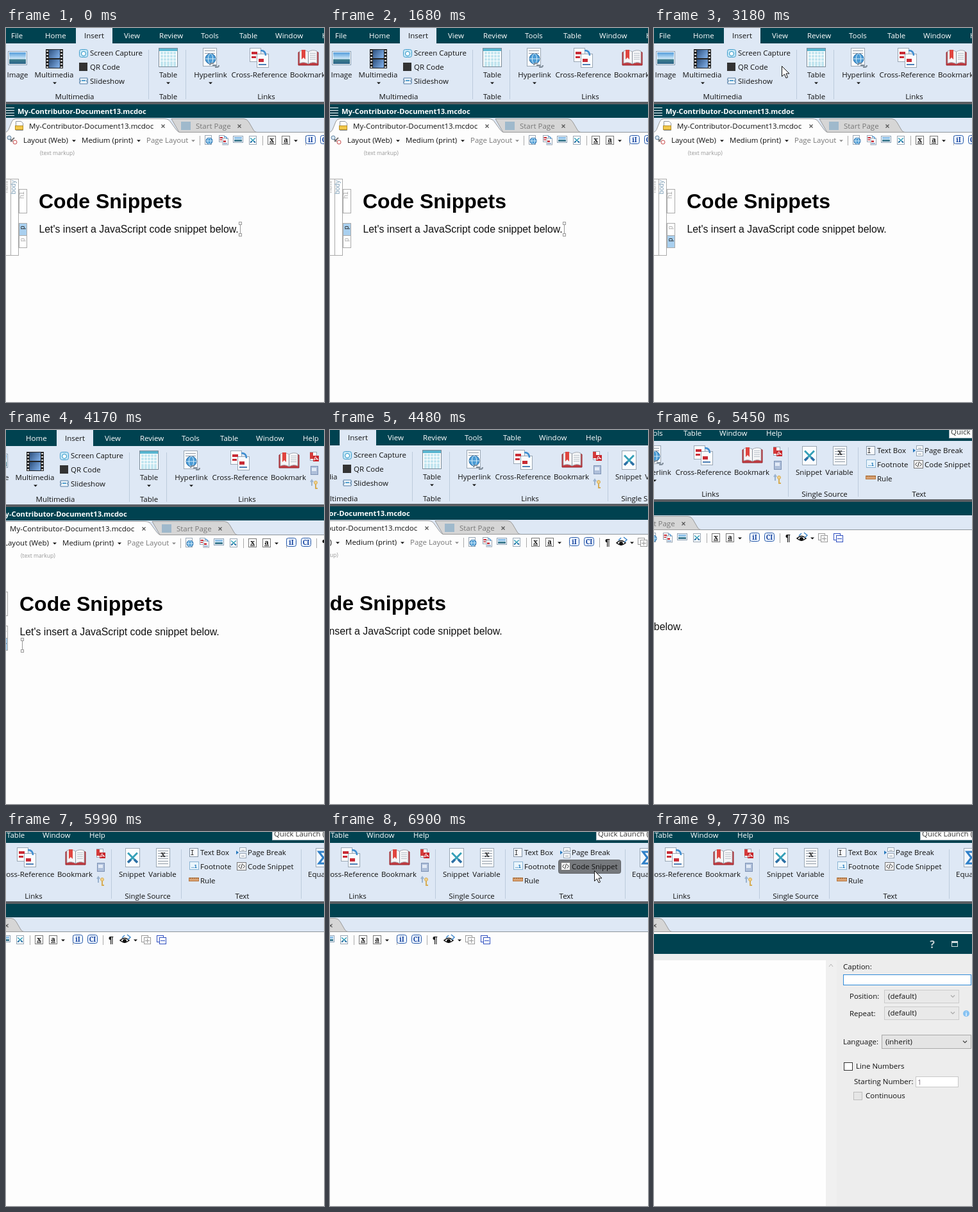
An HTML page with a canvas that plays this animation: 496x583 px, repeating every 8000 ms.

```html
<!DOCTYPE html>
<html lang="en">
<head>
<meta charset="utf-8">
<title>Insert a code snippet</title>
<style>
html, body { margin: 0; width: 100%; height: 100%; overflow: hidden; background: #fdfdfd; }
canvas { display: block; }
</style>
</head>
<body>
<canvas id="stage" width="496" height="583"></canvas>
<script>
const ctx = document.getElementById('stage').getContext('2d');
const UI = '11.5px "Open Sans", "Noto Sans", sans-serif';
const BOLD = 'bold 11.2px "Open Sans", "Noto Sans", sans-serif';
const ARIAL = '"Liberation Sans", Arial, sans-serif';
const TEAL = '#004250', RIBBON = '#dee8f5', PAPER = '#fdfdfd', BLUE = '#3b82c4', INK = '#111';
const LOOP = 8000;

// Moments at which the camera or the pointer takes a new position.
const ticks = [0, 2890, 3040, 3180, 3320, 3460, 4050, 4170, 4320, 4470, 4620, 4770, 4910, 5060,
  5180, 5320, 5450, 5600, 5730, 6240, 6400, 6570, 6740, 6900, 7180, 7320];
const cameraKeys = [[4030, 0, 0], [4170, -30, 1], [4910, -188, -2], [5450, -318, -7], [5640, -363, -7]];
const pointerUp = [[2890, 51, 338], [3040, 127, 231], [3180, 199, 59], [3320, 233, 4]];
const pointerAcross = [[6240, 320, 34], [6570, 345, 41], [6740, 390, 56], [6900, 412, 60]];

function along(keys, t) {
  if (t <= keys[0][0]) return keys[0].slice(1);
  for (let i = 1; i < keys.length; i++) {
    const [t0, x0, y0] = keys[i - 1], [t1, x1, y1] = keys[i];
    if (t <= t1) {
      const k = (t - t0) / (t1 - t0);
      return [Math.round(x0 + (x1 - x0) * k), Math.round(y0 + (y1 - y0) * k)];
    }
  }
  return keys.at(-1).slice(1);
}

// Drawing helpers
function box(x, y, w, h, fill, stroke) {
  if (fill) { ctx.fillStyle = fill; ctx.fillRect(x, y, w, h); }
  if (stroke) { ctx.lineWidth = 1; ctx.strokeStyle = stroke; ctx.strokeRect(x + .5, y + .5, w - 1, h - 1); }
}
function paint(fill, stroke, width = 1) {
  if (fill) { ctx.fillStyle = fill; ctx.fill(); }
  if (stroke) { ctx.lineWidth = width; ctx.strokeStyle = stroke; ctx.stroke(); }
}
function path(d, fill, stroke, x = 0, y = 0, width = 1) {
  ctx.save();
  ctx.translate(x, y);
  ctx.lineWidth = width;
  const p = new Path2D(d);
  if (fill) { ctx.fillStyle = fill; ctx.fill(p); }
  if (stroke) { ctx.strokeStyle = stroke; ctx.stroke(p); }
  ctx.restore();
}
function round(x, y, w, h, r, fill, stroke) {
  ctx.beginPath(); ctx.roundRect(x, y, w, h, r); paint(fill, stroke);
}
function disc(x, y, r, fill, stroke) {
  ctx.beginPath(); ctx.arc(x, y, r, 0, 7); paint(fill, stroke);
}
function text(s, x, y, color = INK, font = UI, align = 'left') {
  ctx.font = font; ctx.fillStyle = color; ctx.textAlign = align; ctx.fillText(s, x, y);
}
const label = (s, x, y) => text(s, x, y, INK, UI, 'center');
function upright(s, x, y, color) {
  ctx.save(); ctx.translate(x, y); ctx.rotate(-Math.PI / 2);
  text(s, 0, 0, color, '10px ' + ARIAL); ctx.restore();
}
const arrow = (x, y, color = INK) => path('M-3-1.5H3L0 1.5Z', color, null, x, y);
const close = (x, y) => path('M-2.5-2.5L2.5 2.5M2.5-2.5L-2.5 2.5', null, '#555', x, y, 1.2);
const chevron = (x, y, color) => path('M-3-1.5L0 1.5L3-1.5', null, color, x, y, 1.2);
const divider = (x, y, h, color = '#bccbdc') => box(x, y, 1, h, color);

// Icons
function page(x, y, w, h, rows = 0) {
  box(x, y, w, h, '#fafcfe', '#9aa7b4');
  for (let i = 0; i < rows; i++) box(x + 3, y + 4 + i * 4, w - 6, 1, '#909aa5');
}
function globe(x, y, r) {
  disc(x, y, r, '#4a9bd5', '#2c6ea8');
  ctx.beginPath(); ctx.ellipse(x, y, r * .45, r, 0, 0, 7); paint(null, '#d5edfa');
  box(x - r, y - .5, 2 * r, 1, '#d5edfa');
}
function picture(x, y, w, h) {
  box(x, y, w, h, '#fff', '#8aa0b5');
  const g = ctx.createLinearGradient(0, y, 0, y + h);
  g.addColorStop(0, '#3c8fd6'); g.addColorStop(.55, '#cfe8f8'); g.addColorStop(.6, '#3f7f8e'); g.addColorStop(1, '#245a86');
  box(x + 2, y + 2, w - 4, h - 4, g);
}
function snippetIcon(x, y, w, h) {
  page(x, y, w, h);
  const l = x + w * .18, r = x + w * .82, t = y + h * .25, b = y + h * .75;
  path(`M${l} ${t}L${r} ${b}M${r} ${t}L${l} ${b}`, null, '#35a0b8', 0, 0, w / 8);
  path(`M${l} ${b}l${w * .2} ${-h * .15}M${r} ${b}l${-w * .2} ${-h * .15}`, null, '#2d6fa5', 0, 0, w / 6);
}
function crossIcon(x, y, s) {
  page(x, y, 18 * s, 22 * s);
  page(x + 11 * s, y + 9 * s, 19 * s, 22 * s);
  box(x + 3 * s, y + 6 * s, 9 * s, 4 * s, '#c92b35');
  box(x + 3 * s, y + 13 * s, 7 * s, 3 * s, '#c92b35');
  box(x + 14 * s, y + 17 * s, 8 * s, 5 * s, '#c92b35');
  box(x + 14 * s, y + 25 * s, 12 * s, 2 * s, '#4c7fb5');
  path(`M${x + 17 * s} ${y + 4 * s}q${8 * s} 0 ${8 * s} ${8 * s}`, null, '#3f8ed0', 0, 0, 2.5 * s);
}
function film(x, y) {
  box(x, y, 27, 30, '#242424');
  for (let i = 0; i < 6; i++) {
    box(x + 1, y + 2 + i * 5, 3, 2, '#d8d8d8');
    box(x + 23, y + 2 + i * 5, 3, 2, '#d8d8d8');
  }
  for (const top of [1, 16]) {
    const g = ctx.createLinearGradient(x, y + top, x + 18, y + top + 13);
    g.addColorStop(0, '#1d3d68'); g.addColorStop(1, '#78a6de');
    box(x + 5, y + top, 17, 13, g);
  }
}
function gridIcon(x, y) {
  box(x, y, 30, 30, '#fff', '#7b8b98');
  box(x + 1, y + 1, 28, 4, '#58b5d0');
  for (let i = 0; i < 5; i++) for (let j = 0; j < 5; j++) box(x + 3 + i * 5, y + 6 + j * 5 - (j > 3), 4, 4, '#c3e6f0');
}
function bookIcon(x, y) {
  path('M0 4Q8 0 15.500 4Q23 0 31 4V24H0Z', '#c23a40', '#96282e', x, y);
  path('M2 2Q9-1 15.500 3Q22-1 29 2V21Q22 18 15.500 22Q9 18 2 21Z', '#f5f6f8', '#a3a9b2', x, y);
  path('M15.500 3V22', null, '#8a939d', x, y);
  path('M5 0H11V15L8 12L5 15Z', '#e0453f', null, x, y);
  for (let i = 0; i < 4; i++) box(x + 18, y + 5 + i * 3, 9, 1, '#b9c1c9');
}
function letterIcon(x, s) {
  box(x, 168, 13, 14, '#fff', '#777');
  text(s, x + 6.5, 178, INK, 'bold 11px "Noto Serif", serif', 'center');
  box(x + 3, 179, 7, 1, INK);
}
function markerIcon(x, s) {
  round(x + .5, 167.5, 15, 13, 3, '#eef5ff', '#2457a8');
  text(s, x + 8, 178, '#123f9c', 'bold 10px "Noto Serif", serif', 'center');
}
function stackIcon(x, sign, color) {
  box(x, 168, 11, 11, '#fff', color);
  box(x + 4, 171, 11, 11, '#fff', color);
  box(x + 6, 176, 7, 1, color);
  if (sign === '+') box(x + 9, 173, 1, 7, color);
}

function drawMenu() {
  box(0, -5, 870, 29, TEAL);
  box(109, -5, 57, 29, RIBBON);
  [['File', 8], ['Home', 61], ['Insert', 122], ['View', 184], ['Review', 239], ['Tools', 304],
    ['Table', 364], ['Window', 420], ['Help', 493]].forEach(([s, x]) => text(s, x, 16, s === 'Insert' ? INK : '#fff'));
  box(778, 1, 92, 19, '#fff', '#a8b7c0');
  text('Quick Launch (Ctrl+Q)', 781, 14, '#333');
}

function drawRibbon(hover) {
  box(0, 24, 870, 91, RIBBON);
  if (hover === 'text') round(645, 28, 70, 22, 3, '#7a7d82');
  if (hover === 'code') round(719.5, 50.5, 97, 21, 3, '#75787c', '#63666a');
  [222, 280, 527, 636, 823].forEach(x => divider(x, 34, 77));
  [['Image', 18], ['Multimedia', 75], ['Table', 253], ['Hyperlink', 319], ['Cross-Reference', 395],
    ['Bookmark', 470.5], ['Snippet', 559.5], ['Variable', 607], ['Equation', 858]].forEach(([s, x]) => label(s, x, 77));
  [['Multimedia', 107], ['Table', 253], ['Links', 406], ['Single Source', 584], ['Text', 731.5]]
    .forEach(([s, x]) => label(s, x, 111));
  [76, 253, 319].forEach(x => arrow(x, 86));
  [['Screen Capture', 131, 43], ['QR Code', 131, 65], ['Slideshow', 131, 87], ['Text Box', 666, 43],
    ['Footnote', 666, 65], ['Rule', 666, 87], ['Page Break', 740, 43], ['Code Snippet', 740, 65]]
    .forEach(([s, x, y]) => text(s, x, y));

  picture(3, 36, 30, 22);
  film(62, 33);
  round(114.5, 33.5, 13, 12, 3, '#c5e7f6', '#429dcc');
  disc(121, 40, 3.5, '#fff', '#1d8fc4');
  box(114, 54, 13, 13, '#333');
  path('M1 1H13V10H1Z M0 3L3 5.500L0 8M14 3L11 5.500L14 8', '#eef5fa', '#527da5', 114, 77);
  box(118, 81, 6, 2, '#55a0cf');
  gridIcon(238, 31);
  page(307, 31, 22, 29, 2);
  globe(319, 48, 8);
  path('M-7 0a3 3 0 0 1 3-3h3M7 0a3 3 0 0 1-3 3h-3M-3 0H3', null, '#7f8c99', 325, 58, 2);
  crossIcon(380, 31, 1);
  bookIcon(456, 34);
  page(504, 33, 11, 14);
  box(504, 34, 5, 10, '#d33b3b');
  box(509, 39, 9, 9, '#c8262c');
  path('M1 7Q4 0 4 2T8 6Q4 4 1 7', null, '#fff', 509, 39);
  box(505, 55, 12, 14, '#aebfda', '#7e93b5');
  box(507, 58, 7, 5, '#e2eaf6');
  path('M2 0V9M0 3L2 0L4 3', null, '#9bb3cf', 505, 77, 2);
  disc(513, 81, 2.5, '#f1d28c', '#d6ac55');
  path('M0 0V7H3', null, '#d6ac55', 513, 83, 2);
  snippetIcon(549, 32, 23, 30);
  page(597, 32, 22, 30, 6);
  text('x', 608, 46, '#333', 'bold 12px "Noto Serif", serif', 'center');

  box(649, 32, 14, 14, '#f8fbff', '#8392a3');
  path('M2 3H6M4 3V10M2 10H6', null, '#333', 649.5, 32.5);
  box(649, 53, 15, 13, '#eaf5fc', '#8ab4d3');
  text('..1', 652, 63, '#1170b5', 'bold 8px ' + ARIAL);
  box(648, 78, 16, 6, '#d9a171', '#b87942');
  for (let i = 0; i < 5; i++) box(650 + i * 3, 78, 1, 2, '#8d582a');
  page(727, 31, 11, 7, 1);
  page(727, 40, 11, 8, 1);
  path('M0 0L4 3L0 6Z', '#2778bd', null, 722, 36);
  box(723, 54, 15, 13, '#f4f4f4', '#777');
  path('M5 3L2 6L5 9M9 3L12 6L9 9M8 2L6 10', null, '#333', 723.5, 54.500);
  box(846, 32, 26, 30, '#f2f7fd', '#9aa7b4');
  path('M16 4H4L11 13L4 22H16', null, '#2f80c8', 847, 34, 3);
}

function drawTabs() {
  box(0, 115, 870, 4, '#5b5e63');
  box(0, 119, 870, 21, TEAL);
  for (let i = 0; i < 4; i++) box(0, 124 + i * 4, 13, 1, '#fff');
  text('My-Contributor-Document13.mcdoc', 18, 134, '#fff', BOLD);
  box(0, 140, 870, 22, RIBBON);
  box(0, 162, 870, 1, '#8e959c');
  path('M258 141.500H371Q376 141.500 379 147L386 159Q388 162.500 391 162.500H270Z', '#d6d6d6', '#999');
  path('M-2 163Q3 162 5 156L9 146Q11 141.500 15 141.500H247Q254 141.500 257 147L265 158Q268 162.500 272 163Z', PAPER);
  path('M-2 163Q3 162 5 156L9 146Q11 141.500 15 141.500H247Q254 141.500 257 147L265 158Q268 162.500 272 163', null, '#999');
  path('M0 0H8L11 3V14H0Z', '#fff', '#8c939b', 15.5, 145.5);
  box(14, 152, 13, 7, '#f2c84b', '#b68f27');
  text('My-Contributor-Document13.mcdoc', 36, 157);
  close(245, 153);
  box(273, 146, 15, 13, '#9fb9cc');
  text('Start Page', 296, 157, '#777');
  close(364, 153);
}

function drawToolbar() {
  box(0, 163, 870, 24, PAPER);
  path('M0 0L7 8M10 2L4 8', null, '#777', 3, 169, 2);
  disc(5, 171, 3, '#d8e6f1', '#5d7f9d');
  disc(14, 178, 3, '#fff', '#c74747');
  text('Layout (Web)', 27, 179);
  text('Medium (print)', 118, 179);
  text('Page Layout', 219, 179, '#777');
  arrow(106, 176); arrow(207, 176); arrow(292, 176, '#888');
  arrow(452, 176); arrow(565, 176);
  [302, 400, 467, 514].forEach(x => divider(x, 168, 15, '#aaa'));
  page(310, 167, 11, 15);
  globe(317, 176, 5);
  crossIcon(332, 167, .5);
  picture(354, 168, 16, 11);
  snippetIcon(379, 168, 12, 14);
  letterIcon(408, 'x');
  letterIcon(430, 'a');
  markerIcon(467 + 0, 'iI');
  markerIcon(490, 'CI');
  text('¶', 527, 180, INK, 'bold 14px ' + ARIAL, 'center');
  path('M0 6Q7-1 14 6Q7 12 0 6Z', '#fff', INK, 541, 170, 1.6);
  disc(548, 177, 3, INK);
  path('M4 1L0 5M8 0L13 4L9 8', null, '#3c86cc', 544, 167, 1.5);
  stackIcon(574, '+', '#999');
  stackIcon(598, '-', '#2f4fc0');
}

function drawDocument(t) {
  const down = t >= 1800;
  text('(text markup)', 53, 198, '#999', '8.6px "Open Sans", "Noto Sans", sans-serif');
  box(-8, 235, 16, 120, '#fff', '#aaa');
  box(7, 235, 13, 120, '#fff', '#aaa');
  box(20, 251, 13, 38, '#fff', '#aaa');
  box(20, 304, 13, 20, down ? '#fff' : '#a9d0ef', '#aaa');
  box(20, 323, 13, 20, down ? '#a9d0ef' : '#fff', '#aaa');
  upright('html', 3, 257, '#aaa');
  upright('body', 15, 259, '#7c9db5');
  upright('h1', 28, 266, '#aaa');
  upright('p', 29, 314, down ? '#aaa' : '#222');
  upright('p', 29, 333, down ? '#222' : '#aaa');
  text('Code Snippets', 51, 281, '#000', 'bold 32px ' + ARIAL);
  text("Let's insert a JavaScript code snippet below.", 51.5, 319, '#111', '15.85px ' + ARIAL);

  const blinkOn = (t - 1555 + 1060) % 1060 < 530;
  if (!down || blinkOn) {
    const x = down ? 55 : 365, y = down ? 323 : 302;
    box(x, y + 4, 1, 15, '#999');
    box(x - 2, y, 5, 5, '#fff', '#999');
    box(x - 2, y + 18, 5, 5, '#fff', '#999');
  }
}

function drawDialog(ready) {
  box(0, 159, 496, 31, TEAL);
  box(0, 190, 496, 393, '#ededed');
  box(0, 200, 268, 383, '#fefefe');
  box(268, 200, 17, 383, '#f0f0f0');
  text('?', 434, 181, '#c3ced2', 'bold 16px "Open Sans", sans-serif', 'center');
  box(464, 170, 10, 9, null, '#d5dde0');
  box(464, 170, 10, 3, '#d5dde0');
  if (!ready) return;
  path('M-3 2L0-2L3 2', null, '#b5b5b5', 276, 208);
  [['Caption:', 295, 214], ['Position:', 305, 260], ['Repeat:', 305, 287], ['Language:', 295, 331],
    ['Line Numbers', 315, 369], ['Starting Number:', 312, 393], ['Continuous', 330, 415]]
    .forEach(([s, x, y]) => text(s, x, y));
  box(295, 222, 200, 17, '#fff', '#2f8ad8');
  for (const y of [246, 272]) {
    box(359, y, 117, 21, '#e9e9e9', '#cbcbcb');
    text('(default)', 365, y + 14);
    chevron(466, y + 10, '#aaa');
  }
  disc(487, 283, 5, '#86c2f2');
  text('i', 487, 287, '#fff', 'bold 9px ' + ARIAL, 'center');
  box(355, 316, 140, 22, '#e4e4e4', '#a9a9a9');
  text('(inherit)', 361, 331);
  chevron(485, 327, '#444');
  box(296, 359, 14, 13, '#fff', '#333');
  box(408, 381, 67, 17, '#fff', '#c8c8c8');
  text('1', 411, 394, '#857a88');
  box(311, 405, 14, 13, '#e6e6e6', '#bdbdbd');
}

const drawPointer = ([x, y]) =>
  path('M0 0V16L4 12.500L6.500 18.500L9 17.400L6.500 11.500H11.500Z', '#fff', '#111', x + .5, y + .5);

function draw(t) {
  const step = ticks.findLast(k => k <= t);
  const [x, y] = along(cameraKeys, step);
  const pointing = step >= 6240 && step < 7320;
  const hover = pointing && (step < 6740 ? 'text' : 'code');

  box(0, 0, 496, 583, PAPER);
  ctx.save();
  ctx.translate(x, y);
  drawMenu();
  drawRibbon(hover);
  drawTabs();
  drawToolbar();
  drawDocument(t);
  ctx.restore();

  if (step >= 7180) drawDialog(step >= 7320);
  if (step >= 2890 && step < 3460) drawPointer(along(pointerUp, step));
  if (pointing) drawPointer(along(pointerAcross, step));
}

function frame() {
  draw(performance.now() % LOOP);
  requestAnimationFrame(frame);
}
frame();
</script>
</body>
</html>
```
